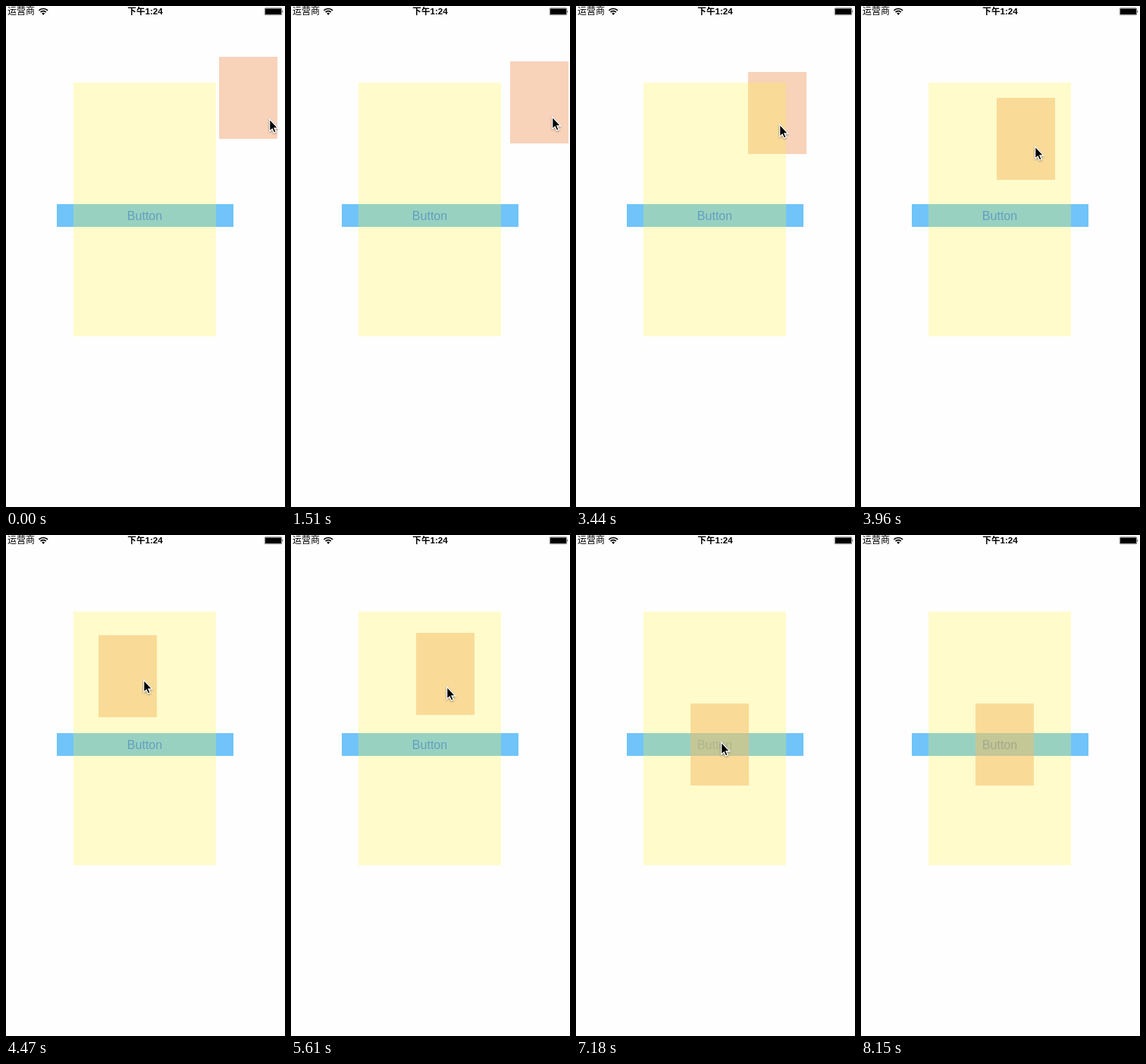
These frames come from a looping animation (368x660 px, 8570 ms). An HTML page:

```html
<!DOCTYPE html>
<html lang="zh">
<head>
<meta charset="utf-8">
<style>
html, body { margin: 0; width: 100%; height: 100%; overflow: hidden; background: #fefefe; }
svg { display: block; }
text { font-family: "Liberation Sans", "Noto Sans CJK SC", "Noto Sans CJK", sans-serif; }
.label { font-size: 16px; text-anchor: middle; }
</style>
</head>
<body>
<svg width="368" height="660" viewBox="0 0 368 660">
  <defs>
    <clipPath id="clip"><rect id="card" width="77" height="108"/></clipPath>
    <filter id="shadow" x="-50%" y="-50%" width="200%" height="200%">
      <feDropShadow dx="0" dy="1" stdDeviation="0.8" flood-opacity="0.45"/>
    </filter>
  </defs>

  <text x="2" y="11.3" font-size="12">运营商</text>
  <g fill="none" stroke="#000" stroke-width="1.7">
    <path d="M43.4 5.9a8.2 8.2 0 0 1 11.6 0M45.6 8.2a5 5 0 0 1 7.2 0"/>
    <path d="M49.2 12l-2-2.2a2.9 2.9 0 0 1 4 0z" fill="#000" stroke="none"/>
  </g>
  <text x="183.5" y="11.2" font-size="11.6" font-weight="bold" text-anchor="middle">下午1:24</text>
  <rect x="341.25" y="2.75" width="22.5" height="9" rx="1" fill="none" stroke="#000" stroke-width=".5"/>
  <rect x="342" y="3.5" width="21" height="7.5"/>
  <path d="M364.5 5.4q1.6 1.8 0 3.6z"/>

  <rect x="67" y="261" width="233" height="30" fill="#70c4f9"/>
  <rect x="89" y="101" width="188" height="334" fill="#fffbcb"/>
  <rect x="89" y="261" width="188" height="30" fill="#99d1c1"/>
  <text class="label" x="183" y="282" fill="#629fbe">Button</text>

  <!-- colours seen through the dragged card -->
  <g clip-path="url(#clip)">
    <rect width="368" height="660" fill="#f8d2b9"/>
    <rect x="89" y="101" width="188" height="334" fill="#f9db97"/>
    <rect x="89" y="261" width="188" height="30" fill="#c4c796"/>
    <text class="label" x="183" y="282" fill="#a1a98a">Button</text>
  </g>

  <path id="cursor" d="M-.3-.8V15L3.2 11.9L5.5 17L8.2 15.9L5.9 10.9H10.6Z" stroke="#fff" stroke-width="1.2" filter="url(#shadow)"/>
</svg>
<script>
const LOOP = 8570, STEP = 87.5, LAST = 93, PRESS_STEPS = 3;

// Key points: [step, x, y]
const cardPath = [
  [13, 281, 67], [18, 291, 75], [27, 284, 53], [34, 292, 56], [39, 227, 87],
  [44, 189, 119], [51, 122, 132], [54, 165, 129], [64, 165, 129], [72, 151, 222]
];
// Pointer position relative to the card
const gripPath = [
  [5, 67, 83], [12, 57, 83], [27, 54, 57], [39, 42, 70], [51, 60, 60],
  [58, 25, 154], [61, 25, 154], [64, 41, 72], [72, 41, 72], [76, 41, 52],
  [88, 41, 52], [93, 239, 468]
];
const presses = [60, 75, 82];

const card = document.getElementById("card");
const cursor = document.getElementById("cursor");
const labels = document.querySelectorAll(".label");

function along(path, n) {
  const i = path.findIndex(k => k[0] > n);
  if (i < 0) return path.at(-1).slice(1);
  const [b, bx, by] = path[i], [a, ax, ay] = path[Math.max(0, i - 1)];
  const p = a < b ? (n - a) / (b - a) : 0;
  return [Math.round(ax + (bx - ax) * p), Math.round(ay + (by - ay) * p)];
}

// A press fades the label out in two steps, then it snaps back.
function labelOpacity(n) {
  const start = presses.find(s => n >= s && n < s + PRESS_STEPS);
  return start === undefined ? 1 : Math.max(0.3, 0.6 - 0.3 * (n - start));
}

function draw(time) {
  const n = Math.min(LAST, Math.floor((time % LOOP) / STEP));
  const [x, y] = along(cardPath, n), [dx, dy] = along(gripPath, n);
  card.setAttribute("x", x);
  card.setAttribute("y", y);
  cursor.setAttribute("transform", `translate(${x + dx} ${y + dy})`);
  labels.forEach(el => el.setAttribute("opacity", labelOpacity(n)));
}

let start;
function tick(now) {
  start ??= now;
  draw(now - start);
  requestAnimationFrame(tick);
}
draw(0);
requestAnimationFrame(tick);
</script>
</body>
</html>
```
